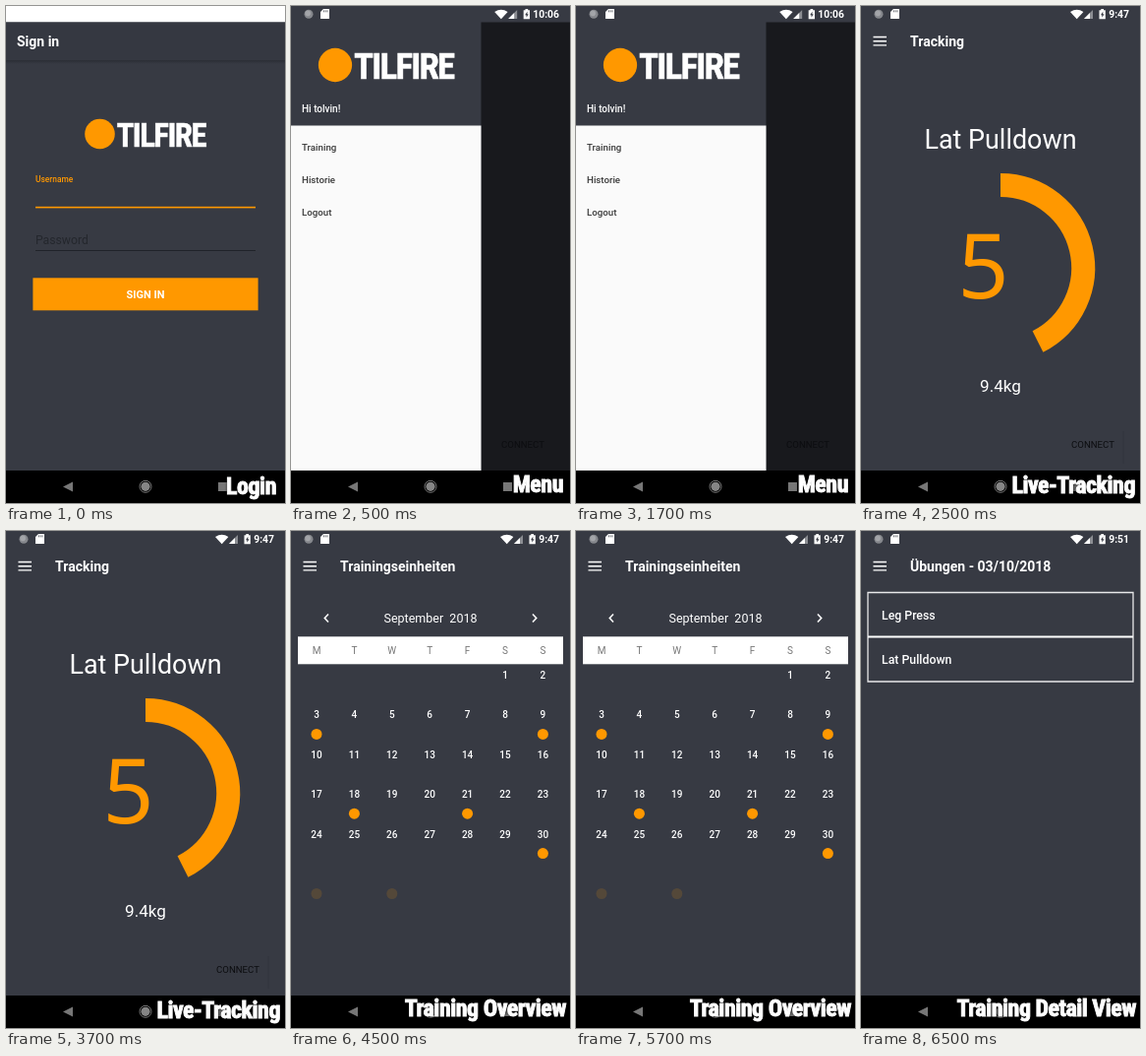
An HTML page that plays this animation: 284 by 505 pixels, repeating every 8 s.

```html
<!DOCTYPE html>
<html lang="en">
<head>
<meta charset="utf-8">
<title>Training app tour</title>
<style>
  html, body { margin: 0; height: 100%; overflow: hidden; background: #373a43; }
  svg { display: block; width: 100vw; height: 100vh; }
  text { font-family: Roboto, sans-serif; white-space: pre; }
  .tight { font-family: "Roboto Condensed", Roboto, "Open Sans Condensed", "Open Sans", sans-serif;
    font-stretch: condensed; font-weight: 700; }
  .caption { font-size: 24px; font-weight: 900; letter-spacing: -.5px;
    stroke: #fff; stroke-width: .9px; filter: drop-shadow(0 0 1px #000); }
  .logo { font-size: 33px; letter-spacing: -1.6px; stroke: #fff; stroke-width: .4px; }
</style>
</head>
<body>
<svg id="stage" viewBox="0 0 284 505"></svg>
<script>
const BG = '#373a43', ORANGE = '#ff9800', INK = '#0c0d10';

const rect = (x, y, w, h, fill, extra = '') =>
  `<rect x="${x}" y="${y}" width="${w}" height="${h}" fill="${fill}" ${extra}/>`;
const path = (d, fill, stroke = 'none', width = 1) =>
  `<path d="${d}" fill="${fill}" stroke="${stroke}" stroke-width="${width}"/>`;
const dot = (x, y, r, fill, extra = '') =>
  `<circle cx="${x}" cy="${y}" r="${r}" fill="${fill}" ${extra}/>`;
const text = (str, x, y, size, { fill = '#fff', weight = 400, anchor = 'start', extra = '' } = {}) =>
  `<text x="${x}" y="${y}" font-size="${size}" fill="${fill}" font-weight="${weight}" text-anchor="${anchor}" ${extra}>${str}</text>`;
const centred = (str, x, y, size, options) =>
  text(str, x, y, size, { anchor: 'middle', ...options });

const caption = (str, right, y) =>
  `<text class="tight caption" x="${right - 1}" y="${y}" fill="#fff" text-anchor="end">${str}</text>`;

const logo = (x, y, scale) =>
  `<g transform="translate(${x} ${y}) scale(${scale})">${dot(0, 0, 15.3, ORANGE)}
  <text class="tight logo" x="17" y="12.5" fill="#fff">TILFIRE</text></g>`;

const navBar = () => rect(0, 472, 284, 33, '#000') +
  path('M58 488.5L68 483.5V493.5Z', '#777') +
  dot(142, 488.3, 4.6, '#858585') +
  dot(142, 488.3, 6, 'none', 'stroke="#777"') +
  rect(216, 484, 9, 9, '#777');

function statusBar(time) {
  const shift = time.length > 4 ? -5.8 : 0;
  return dot(18, 8.2, 4.5, '#85878c') + dot(17.2, 7.4, 2.8, '#a3a5a9') +
    path('M33 3H39V13H30V6Z', '#fff') +
    path('M33.5 4.3V6.3M35.3 4.3V6.3M37.1 4.3V6.3', 'none', BG, .7) +
    `<g transform="translate(${shift} 0)">` +
    path('M213 6Q219.7 1.5 226.4 6L219.7 13.3Z', '#fff') +
    path('M236 4V13H227Z', '#8b8d92') +
    path('M233 7V13H227Z', '#fff') +
    path('M242.5 4.3H244.3V3H247V4.3H248.8V13.3H242.5Z', '#fff') +
    path('M246.4 5.5L244 9.3H245.4V11.8L247.5 8.2H246.2Z', BG) + '</g>' +
    text(time, 273, 12, 10.4, { weight: 700, anchor: 'end' });
}

const appPage = (title, time) => statusBar(time) +
  path('M12.5 31.5H26M12.5 35.7H26M12.5 39.9H26', 'none', '#fff', 1.4) +
  text(title, 50, 41, 14, { weight: 600 });

const connect = () => centred('CONNECT', 236, 448.5, 9.6, { fill: INK });

const login = () => rect(0, 0, 284, 16.5, '#fff') +
  rect(0, 16.5, 284, 38.5, '#353841') + rect(0, 55, 284, 4, 'url(#shade)') +
  text('Sign in', 11, 41, 14, { weight: 600 }) +
  logo(95.5, 130, 1) +
  text('Username', 30, 179, 8.4, { fill: ORANGE, weight: 500 }) +
  rect(30, 203.8, 224, 1.6, ORANGE) +
  text('Password', 30, 242, 12.2, { fill: '#24272d' }) +
  rect(30, 248, 224, 1, '#202329') +
  rect(27.4, 276.3, 229.2, 33, ORANGE) +
  centred('SIGN IN', 142, 297, 11, { weight: 700 }) +
  navBar() + caption('Login', 276, 496);

const menu = () => rect(193.5, 16.5, 90.5, 455.5, '#18191d') + connect() +
  rect(0, 121.5, 193.5, 350.5, '#fafafa') + statusBar('10:06') +
  logo(45, 60, 1.12) +
  text('Hi tolvin!', 11, 107.7, 10, { weight: 500 }) +
  ['Training', 'Historie', 'Logout'].map((item, i) =>
    text(item, 11, 147.2 + i * 33, 9.7, { weight: 500, fill: '#3a3a3a' })).join('') +
  navBar() + caption('Menu', 278, 494);

const tracking = () => appPage('Tracking', '9:47') +
  centred('Lat Pulldown', 142, 145, 26.9) +
  path('M142 182A84 84 0 0 1 180 341', 'none', ORANGE, 24) +
  centred('5', 124.5, 297, 91, { fill: ORANGE, extra: 'style="font-family:Noto Sans,sans-serif"' }) +
  centred('9.4kg', 142, 392, 17.1) +
  connect() + rect(266.5, 432, 1, 33, '#32353e') +
  navBar() + caption('Live-Tracking', 280, 495);

function calendar() {
  const column = i => 26 + i * 38.4;
  const trained = [3, 9, 18, 21, 30];
  let out = appPage('Trainingseinheiten', '9:47') +
    path('M38 84.5L34.3 88.5L38 92.5M246 84.5L249.7 88.5L246 92.5', 'none', '#fff', 1.6) +
    centred('September  2018', 142, 93, 12.5) +
    rect(7, 107.3, 270, 28, '#fff');
  [...'MTWTFSS'].forEach((name, i) => {
    out += centred(name, column(i), 125, 10, { fill: '#777' });
  });
  for (let day = 1; day <= 30; day++) {
    const cell = day + 4, x = column(cell % 7), y = 150 + Math.floor(cell / 7) * 40.4;
    out += centred(day, x, y, 10, { weight: 500 });
    if (trained.includes(day)) out += dot(x, y + 16, 5.5, ORANGE);
  }
  for (const i of [0, 2]) out += dot(column(i), 368.5, 5.5, ORANGE, 'opacity=".15"');
  return out + navBar() + caption('Training Overview', 281, 493);
}

const detail = () => appPage('Übungen - 03/10/2018', '9:51') +
  path('M7 62.5H277V153H7Z', 'none', '#e8e8ea', 1.3) +
  path('M7 107.5H277', 'none', '#fff', 1.9) +
  text('Leg Press', 21, 90, 12.3, { weight: 500 }) +
  text('Lat Pulldown', 21, 135, 12.3, { weight: 500 }) +
  navBar() + caption('Training Detail View', 281, 493);

const scenes = [[0, login], [500, menu], [2500, tracking], [4500, calendar], [6500, detail]];

const stage = document.getElementById('stage');
stage.innerHTML = `<defs><linearGradient id="shade" x2="0" y2="1">
  <stop stop-color="#2b2e35"/><stop offset="1" stop-color="${BG}"/></linearGradient></defs>` +
  rect(0, 0, 284, 505, BG) +
  scenes.map(([, draw]) => `<g class="scene">${draw()}</g>`).join('');
const groups = [...stage.querySelectorAll('.scene')];

const start = performance.now();
function frame() {
  const t = (performance.now() - start) % 8000;
  const current = scenes.findLastIndex(([from]) => t >= from);
  groups.forEach((group, i) => group.style.display = i === current ? '' : 'none');
  requestAnimationFrame(frame);
}
frame();
</script>
</body>
</html>
```
